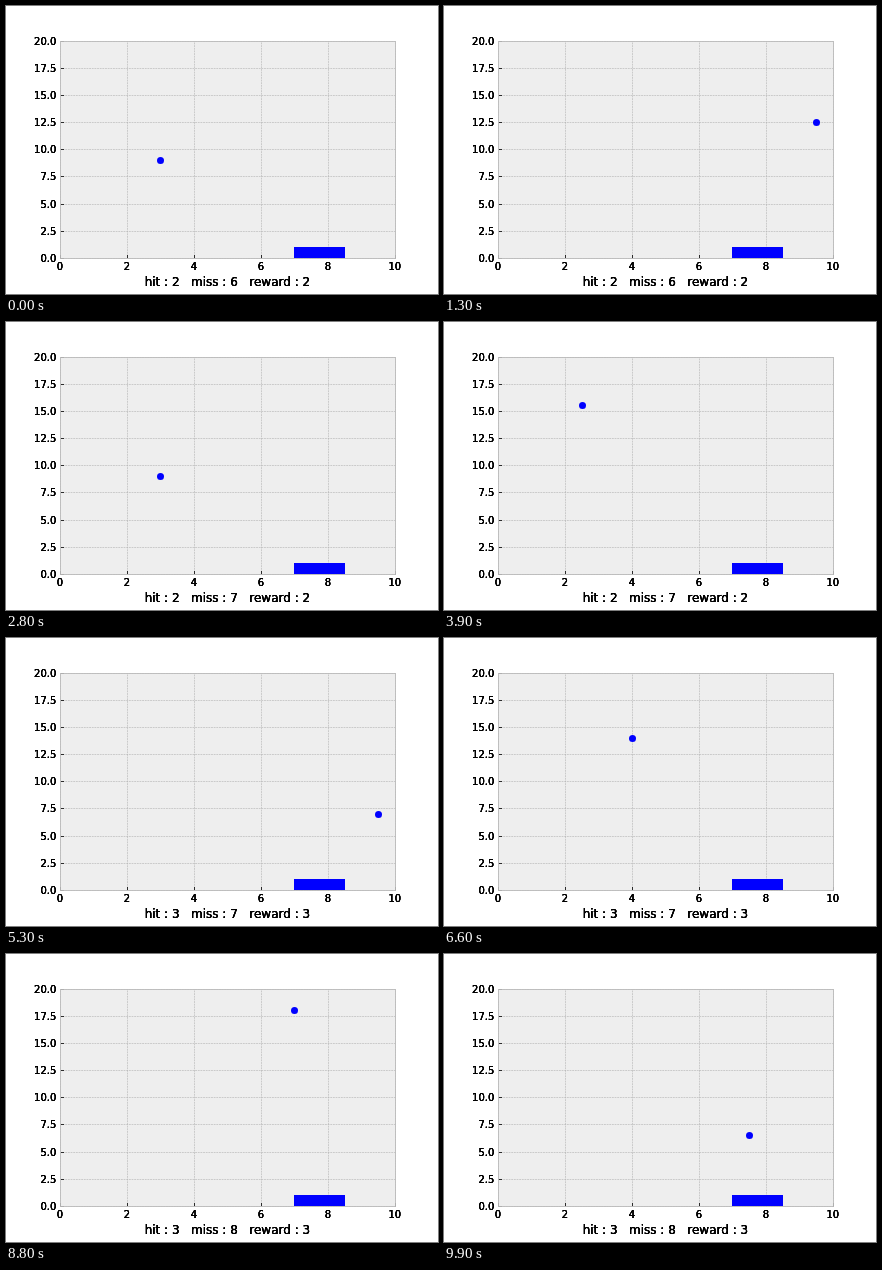
These frames come from a looping animation (432 by 288 pixels, 10000 ms). An HTML page with a canvas:

```html
<!DOCTYPE html>
<html>
<head>
<meta charset="utf-8">
<style>
  html, body { margin: 0; width: 432px; height: 288px; overflow: hidden; background: #fff; }
  canvas { display: block; }
</style>
</head>
<body>
<canvas width="432" height="288"></canvas>
<script>
const ctx = document.querySelector('canvas').getContext('2d');
const STEP = 100, STEPS = 100;
const PADDLE = { left: 7, right: 8.5, height: 1 };

// Chart units to pixel centres
const px = x => Math.round(54 + x * 33.48) + 0.5;
const py = y => Math.round(252 - y * 10.872) + 0.5;

function simulate(steps) {
  const s = { x: 3, y: 9, dx: 0.5, dy: 1.5, hit: 2, miss: 6, reward: 2 };
  for (let i = 0; i < steps; i++) {
    s.x += s.dx;
    s.y += s.dy;
    if (s.x <= 0 || s.x >= 10) s.dx = -s.dx;
    if (s.y > 20) {
      s.y = 20;
      s.dy = -s.dy;
    } else if (s.y < PADDLE.height && s.x >= PADDLE.left && s.x <= PADDLE.right) {
      s.y = PADDLE.height;
      s.dy = -s.dy;
      s.hit++;
      s.reward++;
    } else if (s.y < 0) {
      s.y = 0;
      s.dy = -s.dy;
      s.miss++;
    }
  }
  return s;
}

function line(x1, y1, x2, y2, color, width, dash = []) {
  ctx.strokeStyle = color;
  ctx.lineWidth = width;
  ctx.setLineDash(dash);
  ctx.beginPath();
  ctx.moveTo(x1, y1);
  ctx.lineTo(x2, y2);
  ctx.stroke();
}

// Repeated fills harden the soft glyph edges
function text(str, x, y, size, align) {
  ctx.font = `${size}px "DejaVu Sans", sans-serif`;
  ctx.textAlign = align;
  ctx.fillStyle = '#000';
  for (let i = 0; i < 4; i++) ctx.fillText(str, x, y);
}

function drawGrid() {
  const grid = (...ends) => line(...ends, '#b2b2b2', 0.6, [1.85, 0.8]);
  const tick = (...ends) => line(...ends, '#000', 0.8);
  for (let x = 0; x <= 10; x += 2) {
    grid(px(x), 253, px(x), 35);
    tick(px(x), 252.5, px(x), 249);
    text(String(x), 54 + x * 33.48, 264, 10, 'center');
  }
  for (let y = 0; y <= 20; y += 2.5) {
    grid(54, py(y), 390, py(y));
    tick(54.5, py(y), 58, py(y));
    text(y.toFixed(1), 50.3, py(y) + 3.5, 10, 'right');
  }
}

function draw(step) {
  const s = simulate(step);
  ctx.fillStyle = '#fff';
  ctx.fillRect(0, 0, 432, 288);
  ctx.fillStyle = '#eee';
  ctx.fillRect(54, 35, 336, 218);
  drawGrid();

  ctx.save();
  ctx.beginPath();
  ctx.rect(54, 35, 336, 218);
  ctx.clip();
  ctx.fillStyle = '#00f';
  ctx.fillRect(288, 241, 51, 11);
  ctx.beginPath();
  ctx.arc(px(s.x), py(s.y), 3.5, 0, Math.PI * 2);
  ctx.fill();
  ctx.restore();

  ctx.setLineDash([]);
  ctx.strokeStyle = '#bcbcbc';
  ctx.lineWidth = 0.9;
  ctx.strokeRect(54.5, 35.5, 335, 217);
  text(`hit : ${s.hit}   miss : ${s.miss}   reward : ${s.reward}`, 221.4, 280, 12, 'center');
}

function tick() {
  draw(Math.floor(performance.now() / STEP) % STEPS);
  requestAnimationFrame(tick);
}
tick();
</script>
</body>
</html>
```
